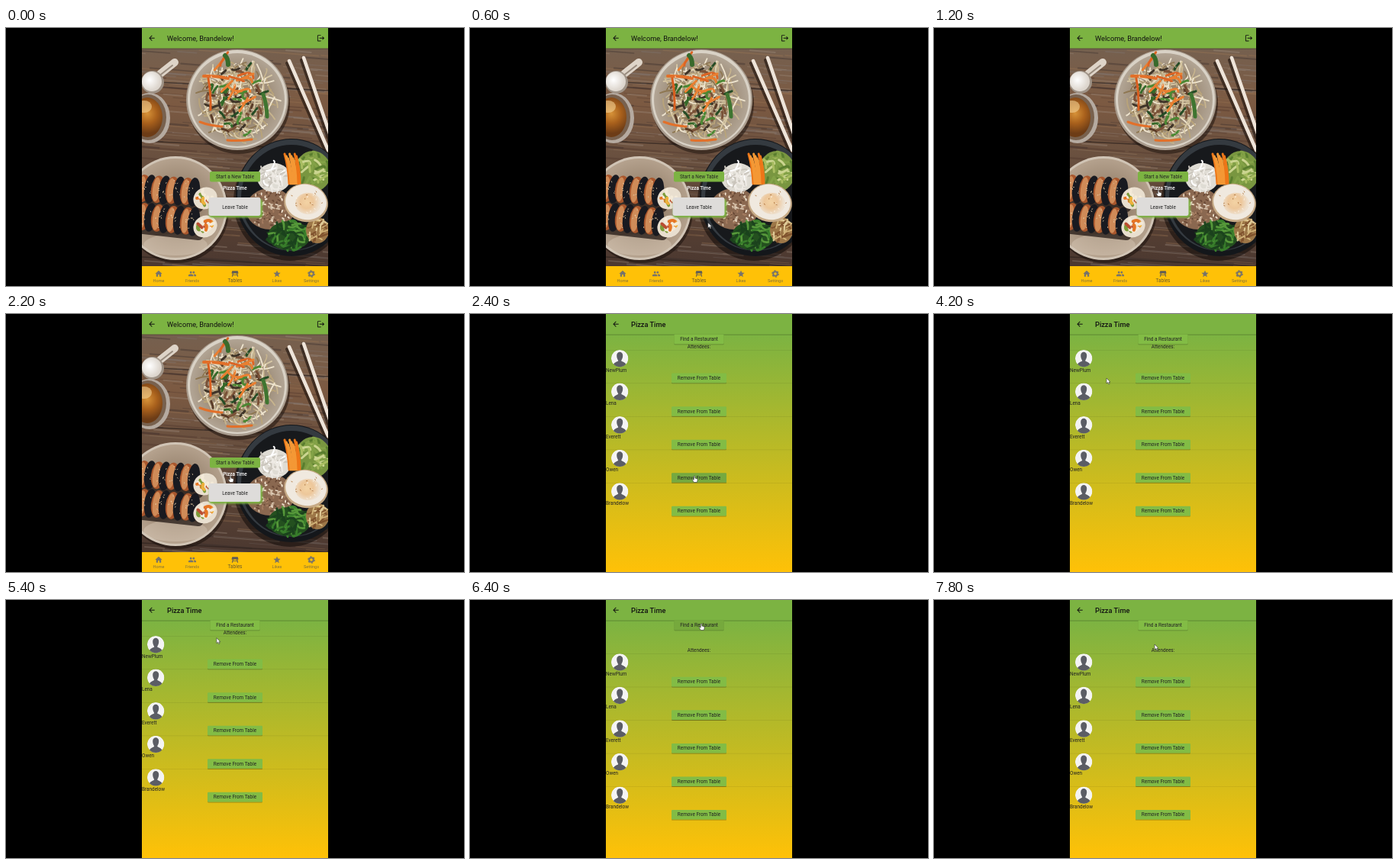
Write an HTML page with a canvas that moves like this. It is 600 px wide and 338 px high and loops after 8000 ms.

```html
<!DOCTYPE html>
<html lang="en">
<head>
<meta charset="utf-8">
<title>Dinner tables</title>
<style>
  html, body { margin: 0; width: 100%; height: 100%; overflow: hidden; background: #000; }
  canvas, svg { position: absolute; }
  canvas { left: 178px; top: 26px; }
  svg { left: 0; top: 0; }
  text { font: 6.4px Roboto, sans-serif; fill: #222; }
</style>
</head>
<body>
<canvas id="photo" width="244" height="286"></canvas>
<svg width="600" height="338" viewBox="0 0 600 338">
  <defs>
    <linearGradient id="fade" x1="0" y1="0" x2="0" y2="1">
      <stop offset=".08" stop-color="#7cb342"/><stop offset="1" stop-color="#ffc107"/>
    </linearGradient>
    <filter id="shadow" x="-20%" y="-30%" width="140%" height="190%">
      <feDropShadow dx="0" dy=".9" stdDeviation=".7" flood-opacity=".35"/>
    </filter>
    <filter id="soft"><feGaussianBlur stdDeviation=".9"/></filter>
    <clipPath id="disc"><circle r="11.2"/></clipPath>
  </defs>
  <g id="home"></g>
  <g id="table"></g>
  <g id="cursor" stroke="#333" stroke-width=".6" fill="#fff" stroke-linejoin="round">
    <path id="arrow" d="M0 0V7L1.7 5.5 2.9 8 4.1 7.4 3 5.1H5z"/>
    <path id="hand" d="M-.8 .5Q0 -.5 .8 .5V3L4 3.9Q4.5 6 3.3 8.5H-.6L-3 5Q-2.5 4 -.8 5.2z"/>
  </g>
</svg>
<script>
const $ = id => document.getElementById(id);

// ---- Food photo ----
let seed = 11;
const random = () => (seed = (seed * 16807) % 2147483647) / 2147483647;
const pick = list => list[Math.floor(random() * list.length)];
const ctx = $('photo').getContext('2d');
ctx.translate(-178, -26);
ctx.lineCap = 'round';

function oval(x, y, rx, ry, fill, angle = 0) {
  ctx.fillStyle = fill;
  ctx.beginPath();
  ctx.ellipse(x, y, rx, ry, angle, 0, 7);
  ctx.fill();
}
function line(x1, y1, x2, y2, color, width, bend = 0) {
  ctx.strokeStyle = color;
  ctx.lineWidth = width;
  ctx.beginPath();
  ctx.moveTo(x1, y1);
  ctx.quadraticCurveTo((x1 + x2) / 2 + bend, (y1 + y2) / 2 - bend, x2, y2);
  ctx.stroke();
}
function scatter(count, x, y, rx, ry, colors, length, width) {
  for (let i = 0; i < count; i++) {
    const a = random() * 6.28, r = Math.sqrt(random()), turn = random() * 6.28;
    const px = x + Math.cos(a) * r * rx, py = y + Math.sin(a) * r * ry;
    const dx = Math.cos(turn) * length / 2, dy = Math.sin(turn) * length / 2;
    line(px - dx, py - dy, px + dx, py + dy, pick(colors), width, (random() - .5) * length);
  }
}
function radial(x, y, r, ...colors) {
  const g = ctx.createRadialGradient(x, y, 0, x, y, r);
  colors.forEach((c, i) => g.addColorStop(i / (colors.length - 1), c));
  return g;
}

function drawWood() {
  const g = ctx.createLinearGradient(0, 26, 0, 312);
  ['#75604f', '#7c5a42', '#69503f', '#5a4234', '#4b3830'].forEach((c, i) => g.addColorStop(i / 4, c));
  ctx.fillStyle = g;
  ctx.fillRect(178, 26, 244, 286);
  ctx.globalAlpha = .35;
  for (let i = 0; i < 260; i++) {
    const x = 160 + random() * 260, y = 26 + random() * 286, w = 20 + random() * 65;
    line(x, y, x + w, y + w * .08, pick(['#33282a', '#9b7554', '#a18f80', '#4b3328', '#807975']), .6 + random() * 2);
  }
  ctx.globalAlpha = .75;
  for (const y of [70, 148, 300]) line(178, y, 422, y + 12, '#30241f', 1.5);
  ctx.globalAlpha = 1;
}

function drawNoodles() {
  oval(305, 99, 67, 66, 'rgba(20,12,8,.5)');
  oval(303, 94, 67, 66, '#a99c8e');
  oval(303, 93, 65, 64, '#d9d2c6');
  oval(303, 94, 62, 61, radial(303, 94, 62, '#a58d6c', '#95836d', '#b2a595'));
  scatter(190, 303, 95, 47, 49, ['#d8c9a6', '#b9a47a', '#efe5cf', '#8e7752', '#c7b48e'], 22, 1.8);
  scatter(34, 303, 96, 43, 46, ['#5a3c28', '#3f3428', '#795137'], 9, 3);
  scatter(22, 308, 94, 43, 47, ['#356929', '#4c8834', '#264c25'], 10, 3);
  scatter(12, 296, 78, 34, 42, ['#dd6424', '#e97f31'], 20, 3);
  line(259, 63, 291, 66, '#e2702a', 4, 2);
  line(265, 66, 268, 107, '#d95f20', 3, 2);
  line(254, 123, 283, 129, '#e2702a', 3, -2);
  line(290, 147, 322, 146, '#e2702a', 3, -2);
  scatter(90, 303, 94, 45, 48, ['#f5eedf', '#e6d9bd'], 1.5, 1);
  line(337, 87, 342, 116, '#3f7530', 5, 2);
  line(287, 36, 291, 48, '#396a2c', 6, 2);
}

function drawSideItems() {
  line(202, 60, 221, 45, '#ded4c8', 10);
  line(199, 64, 218, 49, '#988a7d', 2);
  oval(192, 71, 15, 15, '#9f9387');
  oval(191, 70, 13, 13, radial(188, 68, 14, '#fff', '#ddd6ce'));
  oval(188, 118, 27, 33, '#b5aaa0');
  oval(186, 117, 24, 30, '#78614e');
  oval(185, 117, 20, 26, radial(185, 112, 26, '#d79238', '#a8601c', '#6d3c16'));
  oval(181, 103, 10, 8, 'rgba(250,220,160,.55)');
  for (const [x1, y1, x2, y2] of [[371, 43, 422, 160], [390, 39, 428, 150]]) {
    line(x1 - 3, y1 + 3, x2 - 3, y2 + 3, 'rgba(25,15,10,.6)', 4);
    line(x1, y1, x2, y2, '#eee4d9', 4.5);
  }
}

function drawRolls() {
  oval(224, 240, 68, 68, 'rgba(20,12,8,.5)');
  oval(222, 236, 68, 68, '#d0c4b5');
  oval(222, 236, 65, 65, radial(225, 235, 65, '#82705f', '#9b8772', '#b5a28e'));
  oval(222, 284, 42, 14, 'rgba(225,212,195,.35)');
  for (const [y, slope] of [[210, .07], [247, .1]]) {
    line(180, y + 16, 252, y + 24, 'rgba(25,15,12,.7)', 14);
    for (let i = 0; i < 4; i++) {
      const x = 180 + i * 19, cy = y + (x - 180) * slope;
      oval(x, cy, 9, 18, '#a9572d', .13);
      oval(x - 2, cy, 5, 16, '#cf8b58', .13);
      oval(x + 9, cy + 1, 8, 19, '#191a20', .13);
      scatter(10, x + 4, cy, 9, 14, ['#f0d6ab', '#d9c2a0'], 1, 1);
    }
    oval(261, y + 13, 16, 14, '#e9dfcf', -.5);
    scatter(13, 261, y + 13, 9, 8, ['#e67625', '#efb13c', '#7d9b39', '#f4ead8', '#ba4e31'], 7, 4);
  }
}

function drawBibimbap() {
  oval(372, 227, 74, 78, 'rgba(15,10,8,.55)');
  oval(374, 222, 73, 77, '#14171b');
  oval(374, 219, 71, 73, '#343a40');
  oval(374, 222, 66, 69, '#17191c');
  oval(402, 188, 24, 27, '#799640');
  scatter(36, 402, 187, 20, 23, ['#a9bd61', '#cbd590', '#597d2e', '#83a247'], 12, 3);
  oval(346, 237, 32, 27, '#8a6850');
  scatter(140, 346, 237, 30, 25, ['#d4bfa7', '#694936', '#f0e3d0', '#a57d61'], 2, 1.8);
  oval(351, 196, 22, 19, '#dfdcd4');
  scatter(35, 350, 195, 19, 16, ['#fff', '#eeeae4', '#c9c4bb'], 13, 2);
  for (let i = 0; i < 8; i++)
    line(365 + i * 2.2, 165 + i % 3 * 3, 371 + i * 2, 204, pick(['#ed7618', '#d95813', '#f49835']), 3, 2);
  oval(371, 272, 28, 19, '#24501f');
  scatter(45, 371, 272, 27, 18, ['#387d2b', '#1b421d', '#56983a'], 11, 2.8);
  oval(408, 265, 15, 17, '#9d7748');
  scatter(28, 408, 265, 13, 15, ['#d0b278', '#80532e', '#e0cb98'], 10, 2);
  oval(393, 229, 29, 25, '#c6aa86', .2);
  oval(393, 228, 27, 23, '#f0e9df', .2);
  oval(396, 230, 17, 14, radial(394, 228, 17, '#f3d3a4', '#edc79a', '#eee1d0'));
  scatter(20, 393, 228, 22, 18, ['#b27b45', '#fff5e8'], 1.5, 1);
}

drawWood();
drawNoodles();
drawSideItems();
drawRolls();
drawBibimbap();

// ---- Interface ----
const guests = ['NewPlum', 'Lena', 'Everett', 'Owen', 'Brandelow'];
const icons = {
  back: 'M20 11H7.8l5.6-5.6L12 4l-8 8 8 8 1.4-1.4L7.8 13H20z',
  leave: 'M17 7l-1.4 1.4 2.6 2.6H8v2h10.2l-2.6 2.6L17 17l5-5zM4 5h8V3H4Q2 3 2 5v14q0 2 2 2h8v-2H4z',
  home: 'M10 20v-6h4v6h5v-8h3L12 3 2 12h3v8z',
  people: 'M5 8a3 3 0 1 1 6 0 3 3 0 1 1-6 0M13 8a3 3 0 1 1 6 0 3 3 0 1 1-6 0M1 19v-2.5C1 12 15 12 15 16.5V19zM16 13c3 0 7 1 7 3.5V19h-6v-2.5q0-2-1-3.5z',
  table: 'M4 4h16l2 7H2zM5 11h2.5l-.5 3h10l-.5-3H19l2 9h-2.5l-1-4h-11l-1 4H3z',
  star: 'M12 17.3L18.2 21l-1.7-7L22 9.2l-7.2-.6L12 2 9.2 8.6 2 9.2 7.5 14 5.8 21z'
};
const text = (x, y, s, attrs = '') => `<text x="${x}" y="${y}" ${attrs}>${s}</text>`;
const centred = (y, s, attrs = '') => text(300, y, s, `text-anchor="middle" ${attrs}`);
const icon = (name, x, y, fill) =>
  `<path transform="translate(${x} ${y}) scale(.46) translate(-12 -12)" fill="${fill}" d="${icons[name]}"/>`;
const rect = (x, y, w, h, fill, attrs = '') =>
  `<rect x="${x}" y="${y}" width="${w}" height="${h}" fill="${fill}" ${attrs}/>`;
const button = (y, w, label, id) =>
  rect(300 - w / 2, y - 6.3, w, 12.6, '#82bc45', `rx="1.2" filter="url(#shadow)" id="${id}"`) + centred(y + 2.2, label);
const header = (title, weight) =>
  rect(178, 0, 244, 26.5, '#7cb342', 'filter="url(#shadow)"') + icon('back', 191, 13.3, '#111') +
  text(211, 16.8, title, `style="font-size:9.2px;font-weight:${weight};fill:#111"`);

function tab(x, name, label) {
  const active = label === 'Tables', grey = active ? '#625e55' : '#77736a';
  const mark = name === 'gear'
    ? `<g fill="none" stroke="${grey}"><circle cx="${x}" cy="322" r="2.8" stroke-width="2"/>
       <circle cx="${x}" cy="322" r="4.2" stroke-width="1.3" stroke-dasharray="2.2 2.2"/></g>`
    : icon(name, x, 322, grey);
  return mark + text(x, 333.3, label,
    `text-anchor="middle" style="fill:${active ? '#6b5c2e' : '#80703c'};font-size:${active ? 6.4 : 5.5}px"`);
}

const guestRow = (name, i) => {
  const y = i * 43.55;
  return rect(178, 47 + y, 244, .5, 'rgba(0,0,0,.13)') +
    `<g transform="translate(196.2 ${58.2 + y})" clip-path="url(#disc)"><circle r="11.2" fill="#f4f4f4"/>
     <path fill="#5b5d65" d="M-4 -4C-4 -10 4 -10 4 -4 4 0 2.5 1 2 3 3 5 9 4 9 12H-9C-9 4 -3 5 -2 3-2.5 1-4 0-4-4"/></g>` +
    text(178, 75.6 + y, name) + button(83.9 + y, 72, 'Remove From Table', 'remove' + i);
};

$('home').innerHTML = header(`Welcome, ${guests[4]}!`, 400) + icon('leave', 412.5, 13.3, '#111') +
  rect(267, 188, 66, 13.6, '#7cb342', 'rx="2"') + centred(197, 'Start a New Table') +
  centred(212, 'Pizza Time', 'style="fill:#fff;font-weight:500"') +
  rect(266, 224, 70, 24.5, '#7cb342', 'rx="4" filter="url(#soft)"') +
  rect(265.5, 222, 68, 24, '#dedcda', 'rx="3"') + centred(236.6, 'Leave Table') +
  rect(178, 312, 244, 26, '#ffc107') +
  tab(200, 'home', 'Home') + tab(244, 'people', 'Friends') + tab(300, 'table', 'Tables') +
  tab(355, 'star', 'Likes') + tab(400, 'gear', 'Settings');

$('table').innerHTML = rect(178, 0, 244, 338, 'url(#fade)') + header('Pizza Time', 500) +
  button(33, 65, 'Find a Restaurant', 'find') +
  `<g id="list">${centred(45.3, 'Attendees:')}${guests.map(guestRow).join('')}</g>`;

// ---- Motion: pointer stops as [ms, x, y] ----
const stops = [
  [400, 318, 270], [1000, 294, 212], [2400, 294, 212], [2800, 279, 172], [3400, 279, 172],
  [4200, 226, 84], [4800, 226, 84], [5800, 303, 31], [6800, 303, 31], [7600, 289, 58], [8000, 289, 58]
];
const ease = p => p * p * (3 - 2 * p);
const during = (t, from, to) => t >= from && t < to;
const show = (id, on) => $(id).style.display = on ? '' : 'none';

function pointerAt(t) {
  const i = Math.max(1, stops.findIndex(s => s[0] > t));
  const [t0, x0, y0] = stops[i - 1], [t1, x1, y1] = stops[i];
  const p = ease((t - t0) / (t1 - t0));
  return [x0 + (x1 - x0) * p, y0 + (y1 - y0) * p];
}

function render(now) {
  const t = Math.floor(now % 8000 / 200) * 200;
  const inTable = t >= 2400;
  show('home', !inTable);
  show('table', inTable);
  show('cursor', t >= 400);
  if (t >= 400) $('cursor').setAttribute('transform', `translate(${pointerAt(t)})`);
  const clickable = during(t, 1000, 2600) || during(t, 5800, 7000);
  show('hand', clickable);
  show('arrow', !clickable);
  $('list').setAttribute('transform', `translate(0 ${t >= 6200 ? 23.2 : 0})`);
  $('remove3').setAttribute('fill', during(t, 2400, 3000) ? '#74a93f' : '#82bc45');
  $('find').setAttribute('fill', during(t, 5800, 7000) ? '#76a93e' : '#82bc45');
  requestAnimationFrame(render);
}
render(0);
</script>
</body>
</html>
```
